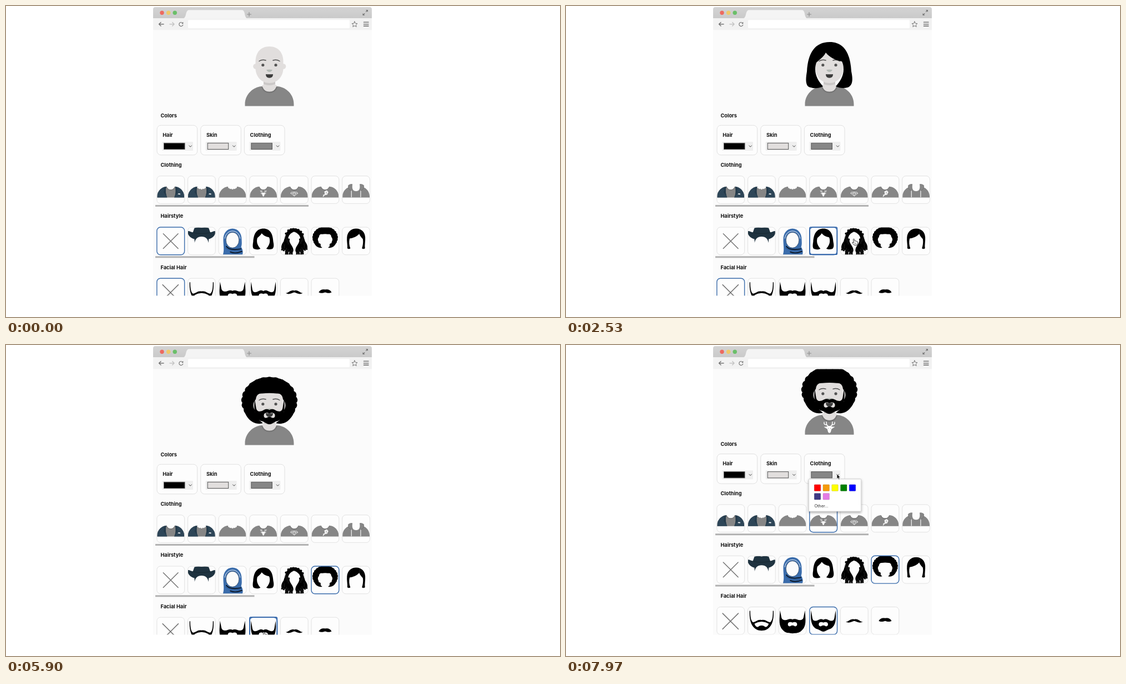
Animation, 998 px wide and 561 px high, one loop 8 s. Source, as an HTML page:

```html
<!DOCTYPE html>
<html lang="en">
<head>
<meta charset="utf-8">
<title>Avatar builder</title>
<style>
html, body { margin: 0; width: 100%; height: 100%; overflow: hidden; background: #fff; }
svg { display: block; }
#stage { width: 100vw; height: 100vh; }
.label { font: 700 9.2px Inter, "Open Sans", sans-serif; fill: #111; }
.other { font: 7.3px Inter, "Liberation Sans", sans-serif; fill: #333; }
</style>
</head>
<body>
<svg id="stage" viewBox="0 0 998 561" xmlns="http://www.w3.org/2000/svg">
  <defs>
    <clipPath id="page"><rect x="265" y="43.5" width="394" height="479"/></clipPath>
    <linearGradient id="bar" x2="0" y2="1"><stop stop-color="#d3d3d3"/><stop offset="1" stop-color="#cacaca"/></linearGradient>
    <filter id="shade" x="-20%" y="-20%" width="140%" height="150%"><feDropShadow dx="0" dy="2" stdDeviation="2.2" flood-opacity=".35"/></filter>
  </defs>
  <rect x="265" y="40" width="394" height="482.5" fill="#fbfbfb"/>
  <g clip-path="url(#page)"><g id="content"></g></g>
  <g id="chrome"></g>
  <g id="popup"></g>
  <g clip-path="url(#page)"><g id="cursor"></g></g>
</svg>
<script>
const $ = id => document.getElementById(id);
const LOOP = 8000, PITCH = 55.65, TILE = 49.8, LEFT = 271.8;
const BLUE = '#3a6cab', CLOTH = '#868686', SKIN = '#e1dedd', NAVY = '#2d4557';

const fill = (d, c = '#000', more = '') => `<path d="${d}" fill="${c}" ${more}/>`;
const line = (d, c, w = 1, more = '') =>
  `<path d="${d}" fill="none" stroke="${c}" stroke-width="${w}" stroke-linecap="round" stroke-linejoin="round" ${more}/>`;
const box = (x, y, w, h, r, c, more = '') =>
  `<rect x="${x}" y="${y}" width="${w}" height="${h}" rx="${r}" fill="${c}" ${more}/>`;
const dot = (x, y, r, c) => `<circle cx="${x}" cy="${y}" r="${r}" fill="${c}"/>`;
const text = (x, y, s, cls = 'label') => `<text class="${cls}" x="${x}" y="${y}">${s}</text>`;

// All avatar parts share the coordinates of the large avatar.
const neckline = 'C462 152 468 154.5 474.5 154.5 C481 154.5 487 152 489 145';
const frill = 'Q460 152 464 150 Q466 155 470 152 Q474.5 157 479 152 Q483 155 485 150 Q489 152 489 145';
const shirt = n => fill(`M430.5 180.5 V177 C430.5 159 446 146 460 145 ${n} C504 146 518.5 159 518.5 177 V180.5Z`, CLOTH);
const tee = shirt(neckline) + line('M461 146.2 C464 154 469 156 474.5 156 C480 156 485 154 488 146.2', '#747474', 2.2);
const frilled = shirt(frill);

const blazer = base => base +
  fill('M430.5 180.5 V177 C430.5 159 446 146 460 145 C457 158 458 170 463 180.5Z', NAVY) +
  fill('M518.5 180.5 V177 C518.5 159 503 146 489 145 C492 158 491 170 486 180.5Z', NAVY) +
  fill('M460 145 L452 150 L454 159 L451 162 L463 180.5 C458 170 457 158 460 145Z', '#243a4a') +
  fill('M489 145 L497 150 L495 159 L498 162 L486 180.5 C491 170 492 158 489 145Z', '#243a4a') +
  fill('M497 170 L501 166.5 L503 168 L506 168 L505 171Z', '#fff');

const deer =
  fill('M469.5 166 Q474.5 163.5 479.5 166 L477.6 173 Q476.8 177.5 474.5 177.5 Q472.2 177.5 471.4 173Z', '#fff') +
  fill('M471 166 L464.5 166.5 L471 170.5Z M478 166 L484.5 166.5 L478 170.5Z', '#fff') +
  line('M472 165 Q470 162 466 162 Q464.5 160 465 158 M469.5 162 L469 157.5 M477 165 Q479 162 483 162 Q484.5 160 484 158 M479.5 162 L480 157.5', '#fff', 1.4) +
  dot(472.6, 169, .6, CLOTH) + dot(476.4, 169, .6, CLOTH);
const gem = line('M466 163 H483 L486 167 L474.5 176 L463 167Z M463 167 H486 M470 167 L474.5 176 L479 167 L474.5 163Z', '#fff', 1.2);
const badge = line('M474 170 L468 177 M471 174 L469 172', '#fff', 2.2) +
  fill('M472 161 L480 157 L485 163 L481 171 L474 173Z', '#fff') +
  line('M475 163 L482 167 M480 160 L477 170', CLOTH, .9);
const hoodie =
  fill('M430.5 180.5 V177 C430.5 162 440 151 449 148 Q445 139 458 136.5 L463 137 Q459 160 474.5 160 Q490 160 486 137 L491 136.5 Q504 139 500 148 C509 151 518.5 162 518.5 177 V180.5Z', CLOTH) +
  line('M449 148 Q452 157 462 160 M500 148 Q497 157 487 160', '#6c6c6c', 1.4) +
  line('M459.5 159 V179 M489.5 159 V179', '#fff', 2);
const clothes = [blazer(tee), blazer(frilled), frilled, tee + deer, tee + gem, tee + badge, hoodie];

const hat = fill('M440 80 L446 63 Q460 59 474.5 62 Q489 59 503 63 L509 80 C518 79 525 73 529 76 C532 90 518 103 503 107 L502 122 C500 107 491 97 474.5 97 C458 97 449 107 447 122 L446 107 C431 103 417 90 420 76 C424 73 431 79 440 80Z', '#1f3340') +
  line('M441 81 Q474.5 90 508 81', '#172831', 2);

const hijab =
  fill('M474.5 65 C452 65 438 84 438 108 C438 135 443 148 436 172 H513 Q520 155 509 138 C513 128 511 116 511 108 C511 84 497 65 474.5 65Z', BLUE) +
  line('M444 104 C447 85 460 75 474.5 75 C489 75 502 85 505 104', '#fff', 2) +
  '<ellipse cx="474.5" cy="111" rx="26" ry="31" fill="#fbfbfb" stroke="#132b4a" stroke-width="1.5"/>' +
  line('M450 136 Q464 154 508 146 M466 158 Q486 167 512 156', '#0a1626', 4) +
  line('M447 142 Q470 158 507 152', '#234d85', 2);

const bob = fill('M441 147 C430 146 432 130 434 118 C436 85 448 65 475 65 C501 65 512 85 514 118 C517 132 517 144 507 147 C500 149 492 148 486 145 C494 136 500 126 500 114 C500 108 499 104 497 100 C485 98 474 92 468 84 C464 92 455 98 451 102 C449 108 449 112 449 114 C449 126 455 136 463 145 C455 149 447 149 441 147Z');

const tips = [[441, 426, 149], [442, 433, 152], [444, 441, 167], [447, 447, 173], [450, 456, 177], [453, 464, 174]];
const locks = tips.map(([a, x, y]) => {
  const lock = (v, s) => `M${v(a)} 108 C${v(a - 7)} 125 ${v(x + 9)} ${y - 34} ${v(x + 3)} ${y - 20} S${v(x + 4)} ${y - 9 + s} ${v(x)} ${y - s}`;
  return lock(v => v, 0) + lock(v => 950 - v, 2);
}).join('');
const strands = tips.slice(1).map(([a, x, y], i) =>
  `M${x + 3} ${y - 24} q-2 8 0 15 M${946 - x} ${y - 27} q3 8 1 17 M${a - 3 + i} ${88 + i * 7} q-4 7 -4 12 M${954 - a - i} ${90 + i * 6} q4 5 4 11`).join('');
const curls =
  fill('M472 64 C456 64 443 76 440 92 C436 104 431 118 428 138 C434 148 446 160 463 158 C466 151 465 146 461 141 C453 134 450 122 450 106 C451 92 461 83 473 78 C487 82 498 92 499 106 C499 122 496 134 488 141 C484 147 484 154 487 158 C504 160 516 148 522 138 C519 118 514 104 510 92 C506 76 490 64 472 64Z') +
  [[451, 73], [461, 68.5], [471, 67.5], [481, 68.5], [491, 71], [501, 78], [508, 88], [442, 85]].map(p => dot(...p, 4.7, '#000')).join('') +
  line(locks, '#000', 7) + line(strands, '#777', .6);

const bumps = Array.from({ length: 21 }, (_, i) => {
  const a = (-235 + i * 14.5) * Math.PI / 180;
  return dot(474.5 + 43.5 * Math.cos(a), 101 + 36.5 * Math.sin(a), 7.3, '#000');
}).join('');
const afro = bumps + fill('M463 141 C442 147 425 125 427 100 C429 70 450 58 474.5 58 C499 58 520 70 522 100 C524 125 507 147 486 141 C495 135 500 126 501 117 C505 110 504 104 499 98 C498 90 494 87 488 87.5 Q474.5 86 461 87.5 C455 87 451 90 450 98 C445 104 444 110 448 117 C449 126 454 135 463 141Z');

const short = fill('M440 144 C441 130 437 114 438.5 100 C440 78 455 65 475 65 C497 65 510 80 511 100 C512 115 508 130 510 144 C506 147 502 147 498 144 C502 132 504 116 501 106 C495 100 490 94 487 86 C478 97 464 102 449 105 C446 118 447 132 452 144 C448 147 444 147 440 144Z') +
  line('M488 85 Q492 78 489 72', '#555', .8);

const cross = (x, y, s, w) => line(`M${x - s} ${y - s} L${x + s} ${y + s} M${x + s} ${y - s} L${x - s} ${y + s}`, '#757575', w);
const hairs = [cross(474.5, 115, 29.5, 3.4), hat, hijab, bob, curls, afro, short];

const hole = 'M464.5 126.5 C465 121.5 471 121.5 474.5 123.5 C478 121.5 484 121.5 484.5 126.5 C485 132 480 132.5 478 130.5 Q474.5 128.5 471 130.5 C469 132.5 464 132 464.5 126.5Z';
const odd = 'fill-rule="evenodd"';
const stubble = fill('M448.5 98 C447 122 455 141 474.5 141 C494 141 502 122 500.5 98 L499 98 C499 114 497 120 493 123 C486 122 483 116 474.5 118 C466 116 463 122 456 123 C452 120 450 114 450 98Z M459 126 Q474.5 117 490 126 C488 133 483 135 480 131 Q474.5 129 469 131 C466 135 461 133 459 126Z', '#000', odd);
const full = fill('M447.5 97 C446 118 444 131 454 140 C460 147 468 146 474.5 147 C481 146 489 147 495 140 C505 131 503 118 501.5 97 L498.5 112 C497 119 489 119 485 117 C481 115 476 116 474.5 117 C473 116 468 115 464 117 C460 119 452 119 450.5 112Z ' + hole, '#000', odd);
const beard = fill('M448 97 C446 117 448 131 459 137 C466 138 469 143 474.5 143 C480 143 483 138 490 137 C501 131 503 117 501 97 L498.5 113 C497 122 490 120 486 118 C481 114.5 476 116 474.5 117.5 C473 116 468 114.5 463 118 C459 120 452 122 450.5 113Z ' + hole, '#000', odd);
const stache = fill('M456 121.5 C462 122.5 466 113.5 474.5 116.5 C483 113.5 487 122.5 493 121.5 C486 126 480 121.5 474.5 120 C469 121.5 463 126 456 121.5Z');
const chevronStache = fill('M460.5 120 C464 113.5 470 113 474.5 114 C479 113 485 113.5 488.5 120 C484 122.5 479 121.5 474.5 120 C470 121.5 465 122.5 460.5 120Z');
const beards = [cross(474, 120.5, 17, 1.9), stubble, full, beard, stache, chevronStache];

const head =
  fill('M464 130 H485 V142 Q489 143 489 146 V150 Q474.5 162 460 150 V146 Q460 143 464 142Z', SKIN) +
  fill('M464 136 H485 V141 Q474.5 145 464 141Z', '#cbc8c7') +
  dot(450, 109, 4.8, SKIN) + dot(499.5, 109, 4.8, SKIN) +
  fill('M449.5 100 C449.5 84 459 73 474.5 73 C490 73 499.5 84 499.5 100 V112 C499.5 128 488 139 474.5 139 C461 139 449.5 128 449.5 112Z', SKIN) +
  line('M456 99.5 Q461 96 468 98 M493 99.5 Q488 96 481 98', '#4c4c4c', 1.4) +
  dot(462.8, 106.5, 2.6, '#555') + dot(486, 106.5, 2.6, '#555') +
  fill('M469 115 Q474.5 114 480 115 Q478 119 474.5 119 Q471 119 469 115Z', '#b4bab5') +
  fill('M468 123 H481 Q481 129.8 474.5 129.8 Q468 129.8 468 123Z', '#3b3b3b') +
  fill('M469.5 123 H479.5 V124.2 H469.5Z', '#565656');

const rows = [
  { name: 'Clothing', y: 306.6, art: clothes, view: '429.6 110.5 89.8 89.8', bar: 276 },
  { name: 'Hairstyle', y: 399, art: hairs, view: '419.6 59.6 109.9 109.9', bar: 178.5 },
  { name: 'Facial Hair', y: 491.2, art: beards, view: '444.5 89.5 60 60' }
];
const tileX = i => LEFT + i * PITCH;

function buildContent() {
  let s = `<g>${head}${tee}</g><g id="print">${deer}</g><g id="beard">${beard}</g>` +
    [bob, curls, afro].map((h, i) => `<g id="hair${i + 3}">${h}</g>`).join('') + text(278.5, 201, 'Colors');
  [['Hair', '#000'], ['Skin', SKIN], ['Clothing', CLOTH]].forEach(([name, c], i) => {
    const x = 272 + i * 78.7;
    s += box(x, 215.2, 72.6, 53.6, 7, '#fdfdfd', 'stroke="#e0e0e0"') + text(x + 10.2, 236, name) +
      box(x + 9, 245, 56, 16, 1, '#efefef') +
      box(x + 12.5, 247.3, 37.5, 11.2, 0, c, 'stroke="#555"') +
      line(`M${x + 57.8} 251.8 l2.3 2.4 2.3 -2.4`, '#444', 1);
  });
  rows.forEach((row, r) => {
    s += text(278.5, row.y - 16.6, row.name);
    row.art.forEach((art, i) => {
      const x = tileX(i), size = `x="${x}" y="${row.y}" width="${TILE}" height="${TILE}"`;
      s += `<rect ${size} rx="6.5" fill="#fdfdfd"/><svg ${size} viewBox="${row.view}">${art}</svg>` +
        `<rect id="edge${r}${i}" ${size} rx="6.5" fill="none"/>` +
        `<rect id="ring${r}${i}" x="${x + .3}" y="${row.y}" width="${TILE - .6}" height="${TILE - .6}" rx="1.8" fill="none" stroke="#2b60a8" stroke-width="1.7"/>`;
    });
    if (row.bar) s += box(269, row.y + 52.3, row.bar, 3, 0, '#b1b1b1');
  });
  $('content').innerHTML = s;
}

function buildChrome() {
  $('chrome').innerHTML =
    fill('M265 22.5 V6 Q265 2 269 2 H655 Q659 2 659 6 V22.5Z', 'url(#bar)') +
    box(265, 22, 394, 21.3, 0, '#f2f2f2') +
    fill('M320 22.5 Q323 21 324.5 13 Q326 7.3 330 7.3 H425 Q428.5 7.3 429.8 13 Q431 21 434 22.5Z', '#f4f4f4') +
    box(328, 25.3, 291, 14.8, 1.5, '#fff') +
    dot(281, 12.2, 3.7, '#ed6b60') + dot(292.6, 12.2, 3.7, '#f0cb68') + dot(304.2, 12.2, 3.7, '#6abf69') +
    line('M438 11.5 V18.5 M434.5 15 H441.5', '#8d8d8d', 1.2) +
    line('M643.5 16 L646 13.5 M648.5 10.5 L651 8', '#777', 1.1) +
    fill('M642.5 13 V17 H646.5Z M652 11 V7 H648Z', '#777') +
    line('M284 32.8 H275.5 M279 29.5 L275.5 32.8 L279 36', '#777', 1.5) +
    line('M295 32.8 H303 M299.7 29.5 L303 32.8 L299.7 36', '#c4c4c4', 1.5) +
    line('M318.2 31 A3.5 3.5 0 1 0 318.7 34', '#777', 1.2) + fill('M319.3 28.8 V32 H316.1Z', '#777') +
    line('M628 28 L629.5 31.3 L633 31.6 L630.4 34 L631.2 37.5 L628 35.7 L624.8 37.5 L625.6 34 L623 31.6 L626.5 31.3Z', '#777', 1) +
    line('M644.5 29.3 H653 M644.5 32.7 H653 M644.5 36.1 H653', '#777', 1.6);
  const colors = ['#f00', '#f59a0c', '#ff0', '#008000', '#00f', '#403a84', '#e47be4'];
  $('popup').innerHTML = box(437.3, 241.8, 94.4, 58.2, 1, '#fff', 'stroke="#c4c4c4" stroke-width=".8" filter="url(#shade)"') +
    colors.map((c, i) => box(447.2 + i % 5 * 15.75, 251.8 + (i > 4 ? 15.7 : 0), 11.6, 11.6, 1, c, 'stroke="#0003" stroke-width=".6"')).join('') +
    text(447.4, 292.8, 'Other…', 'other');
  $('cursor').innerHTML =
    `<g id="arrow">${fill('M0 0 V9 L2 7.2 L3.5 10.3 L5 9.6 L3.6 6.6 H6.3Z', '#111', 'stroke="#fff" stroke-width=".7"')}</g>` +
    `<g id="hand">${fill('M-1 .8 Q0 -.8 1.2 .8 L1.8 4 Q3 3 3.8 4.2 Q5 3.4 5.5 4.7 Q6.9 4.4 7 6 Q7 9 5.8 11.3 H.8 Q-.5 9 -2.6 7.4 Q-3 5.8 -1.2 6.2 L0 7Z', '#fff', 'stroke="#222" stroke-width=".9" stroke-linejoin="round"')}` +
    `${line('M2 7.2 V9.2 M3.6 7.2 V9.2', '#444', .6)}</g>`;
}

// time, x, y of the pointer tip
const path = [
  [370, 364, 526], [1170, 467.5, 421], [2000, 467.5, 421], [2630, 522, 420], [3030, 522, 420],
  [3400, 536, 468], [3530, 539.3, 461.5], [3770, 582, 412], [4330, 582, 412], [4740, 452, 526],
  [5400, 464, 526], [5860, 464, 517.5], [5900, 464, 517.5], [6030, 490, 457.5], [6480, 490, 457.5],
  [7000, 464, 319], [7280, 464, 319], [7830, 488, 232.5]
];
// press, release, row, tile
const clicks = [[1570, 1700, 1, 3], [2770, 2830, 1, 4], [3870, 4000, 1, 5], [5130, 5270, 2, 3], [7030, 7130, 0, 3]];

function pointer(t) {
  const i = path.findIndex(p => p[0] > t);
  if (i < 0) return path[path.length - 1].slice(1);
  if (!i) return path[0].slice(1);
  const [a, b] = [path[i - 1], path[i]];
  const u = (t - a[0]) / (b[0] - a[0]), e = u * u * (3 - 2 * u);
  return [a[1] + (b[1] - a[1]) * e, a[2] + (b[2] - a[2]) * e];
}

const show = (id, on) => $(id).setAttribute('visibility', on ? 'visible' : 'hidden');

function draw(t) {
  const u = Math.min(1, Math.max(0, (t - 6180) / 300));
  const scroll = 18.7 * (1 - (1 - u) ** 3);
  $('content').setAttribute('transform', `translate(0 ${-scroll})`);

  const picked = [-1, 0, 0];
  let focus = '';
  for (const [down, up, r, i] of clicks) {
    if (t >= down) focus = `${r}${i}`;
    if (t >= up) picked[r] = i;
  }
  if (t >= 7870) focus = '';

  const [x, y] = pointer(t);
  let over = false;
  rows.forEach((row, r) => row.art.forEach((_, i) => {
    const on = picked[r] === i, edge = $(`edge${r}${i}`), dx = x - tileX(i), dy = y + scroll - row.y;
    edge.setAttribute('stroke', on ? BLUE : '#e2e2e2');
    edge.setAttribute('stroke-width', on ? 1.4 : 1);
    show(`ring${r}${i}`, focus === `${r}${i}`);
    if (dx > 0 && dx < TILE && dy > 0 && dy < TILE) over = true;
  }));
  [3, 4, 5].forEach(i => show(`hair${i}`, picked[1] === i));
  show('beard', picked[2] === 3);
  show('print', picked[0] === 3);
  show('popup', t >= 7970);
  $('cursor').setAttribute('transform', `translate(${x} ${y})`);
  show('arrow', !over);
  show('hand', over);
}

function frame() {
  draw(performance.now() % LOOP);
  requestAnimationFrame(frame);
}
buildContent();
buildChrome();
frame();
</script>
</body>
</html>
```
